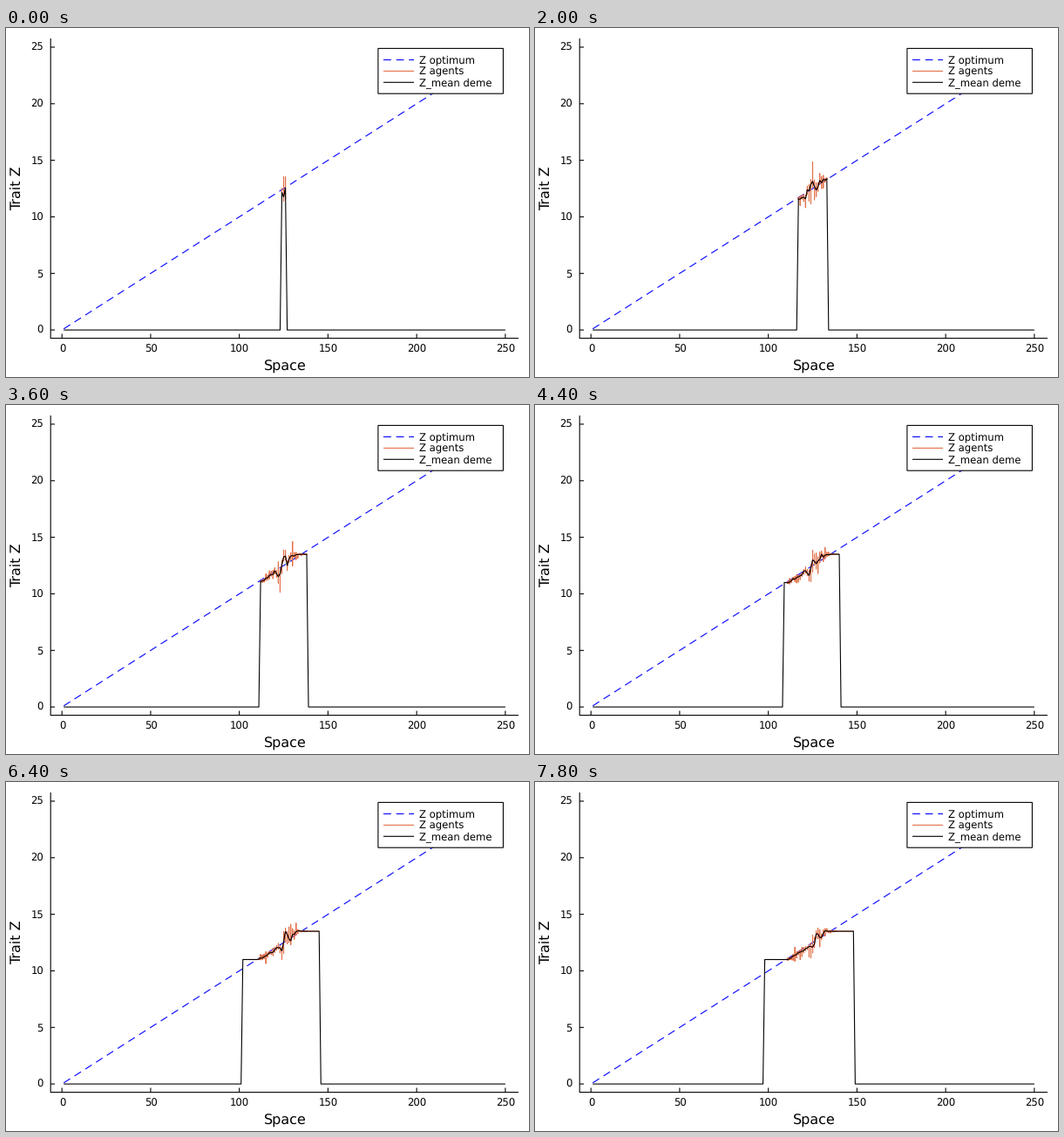
Recreate the animation shown at these times as a matplotlib script. Size 600 by 400 pixels, loop 8 s.

```python
import numpy as np
import matplotlib.pyplot as plt
from matplotlib.animation import FuncAnimation
from matplotlib.patches import Rectangle

W, H, DPI = 600, 400, 100
FRAMES, STEP = 40, 200
PX = 72 / DPI
ORANGE = "#e36f47"
DASH = dict(linestyle=(0, (8, 5.33)), dash_capstyle="butt")

plt.rcParams.update({"font.family": "DejaVu Sans", "text.hinting": "none",
                     "path.snap": False})


def sx(x):
    return 64.2 + 2.0346 * np.asarray(x)


def sy(z):
    return 346.1 - 12.965 * np.asarray(z)


def borders(n):
    """Empty demes on either side of the growing population."""
    return round(123.3 - 0.685 * n), round(127 + 1.1 * n ** 0.82)


def mean_trait(n, x):
    """Ramp between two plateaus with a step that drifts to the right."""
    step = 123 + 3.5 * (n / FRAMES) ** 2
    grown = min(1, n / 12)
    d = x - step - 1
    wave = 0.4 * np.cos(1.3 * d) * np.exp(-(d / 4) ** 2)
    jump = 0.5 / (1 + np.exp(-2 * (x - step)))
    return np.clip(11 + 0.09 * (x - 111) + grown * (jump + wave), 11, 13.5)


def spread(n, x, lo, hi):
    """Typical deviation of agents, widest in the middle of the range."""
    age = n / FRAMES
    core = (1.4 - 0.6 * age) * np.exp(-((x - 125 - 2 * age) / 5.5) ** 2)
    flank = 0.4 * np.clip((x - 110) / 5, 0, 1) * (x < 133)
    edge = np.clip(np.minimum(x - lo, hi - x) / 2, 0, 1)
    return np.maximum(core, flank) * edge * (x > 110) * (x < 140)


def curves(n):
    rng = np.random.default_rng(70 + n)
    lo, hi = borders(n)
    x = np.arange(lo + 1, hi)
    dev = spread(n, x, lo, hi)
    z = mean_trait(n, x) + rng.normal(0, 0.35 - 0.006 * n, x.size) * dev
    up, down = dev * np.minimum(0.25 + rng.exponential(0.45, (2, x.size)), 1.9)
    agents = np.column_stack([z, z + up, z - down, z]).ravel()
    mean = np.concatenate([[0, 0], z, [0, 0]])
    return ((np.repeat(x, 4), agents),
            (np.concatenate([[1, lo], x, [hi, 250]]), mean))


fig = plt.figure(figsize=(W / DPI, H / DPI), dpi=DPI, facecolor="white")
ax = fig.add_axes([0, 0, 1, 1])
ax.set_xlim(0, W)
ax.set_ylim(H, 0)
ax.axis("off")


def line(x, y, color="black", width=1.1, z=2, **kw):
    return ax.plot(x, y, color=color, lw=width * PX, zorder=z,
                   solid_joinstyle="round", solid_capstyle="butt", **kw)[0]


def label(x, y, text, size=11.6, ha="left"):
    ax.text(x, y, text, fontsize=size * PX, ha=ha, va="baseline", zorder=7)


# Axes
line([51.2, 51.2], [12, 356])
line([51, 588], [355.6, 355.6])
for v in range(0, 251, 50):
    line([sx(v)] * 2, [355.5, 350.5])
    label(sx(v) + 0.3, 372, str(v), ha="center")
for v in range(0, 26, 5):
    line([51, 56], [sy(v)] * 2)
    label(43, sy(v) + 4.2, str(v), ha="right")
label(319.9, 393, "Space", 16, ha="center")
ax.text(20, 183.3, "Trait Z", fontsize=16 * PX, rotation=90,
        ha="right", va="center")

# Data lines
line(sx([1, 249]), sy([0.1, 24.9]), "blue", z=3, **DASH)
agent_line = line([], [], ORANGE, z=4)
mean_line = line([], [], z=5)

# Legend
ax.add_patch(Rectangle((426.9, 23.4), 143.5, 51.8, fc="white", ec="black",
                       lw=1.1 * PX, zorder=6))
for i, (text, color, style) in enumerate((("Z optimum", "blue", DASH),
                                          ("Z agents", ORANGE, {}),
                                          ("Z_mean deme", "black", {}))):
    y = 36.5 + 12.9 * i
    line([433, 468], [y, y], color, z=7, **style)
    label(474, y + 4.1, text)


def draw(n):
    for art, (x, z) in zip((agent_line, mean_line), curves(n)):
        art.set_data(sx(x), sy(z))
    return agent_line, mean_line


anim = FuncAnimation(fig, draw, frames=FRAMES, interval=STEP,
                     repeat=True, repeat_delay=0)
plt.show()
```
